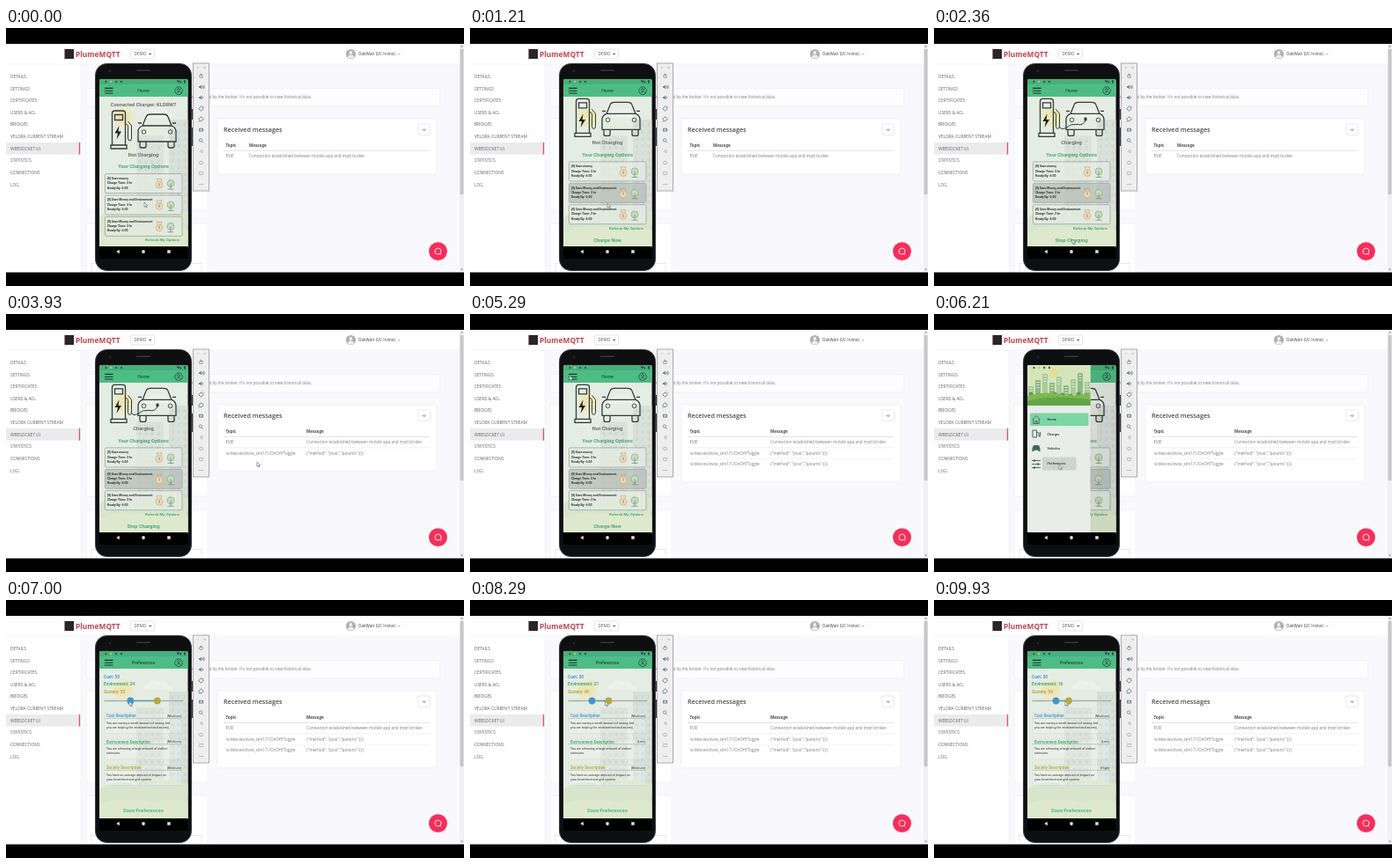
Recreate the animation shown at these times as an HTML page. Size 520 px wide and 293 px high, loop 10 s.

```html
<!DOCTYPE html>
<html lang="en">
<head>
<meta charset="utf-8">
<title>Charging app demo</title>
<style>
html, body { margin: 0; width: 100%; height: 100%; overflow: hidden; background: #000; }
svg { display: block; width: 100vw; height: 100vh; font-family: "Open Sans", "Noto Sans", sans-serif; }
.app { font-family: Roboto, sans-serif; }
</style>
</head>
<body>
<svg id="stage" viewBox="0 0 520 293" preserveAspectRatio="none"></svg>
<script>
const LOOP = 10000;
const GREEN = '#4dbd85', LEAF = '#4aab76', BLUE = '#3d98d0', GOLD = '#b9a83c';

const text = (x, y, s, size, fill, extra = '') =>
  `<text x="${x}" y="${y}" dy=".35em" font-size="${size}" fill="${fill}" ${extra}>${s}</text>`;
const rect = (x, y, w, h, fill, extra = '') =>
  `<rect x="${x}" y="${y}" width="${w}" height="${h}" fill="${fill}" ${extra}/>`;
const circle = (x, y, r, fill, extra = '') => `<circle cx="${x}" cy="${y}" r="${r}" fill="${fill}" ${extra}/>`;
const line = (d, stroke, width = .6, extra = '') =>
  `<path d="${d}" fill="none" stroke="${stroke}" stroke-width="${width}" ${extra}/>`;
const group = (id, body) => `<g id="${id}">${body}</g>`;
const repeat = (n, fn) => Array.from({ length: n }, (_, i) => fn(i)).join('');
const BOLD = 'font-weight="700"', MID = 'text-anchor="middle"', END = 'text-anchor="end"';

function webPage() {
  const menu = ['DETAILS', 'SETTINGS', 'CERTIFICATES', 'USERS &amp; ACL', 'BRIDGES',
    'VELORA CURRENT STREAM', 'WEBSOCKET UI', 'STATISTICS', 'CONNECTIONS', 'LOG'];
  const edge = 'stroke="#e9eaf0" stroke-width=".6"';
  const message = (id, y, topic, body) => group(id,
    text(249.5, y, topic, 4.6, '#7c7c7c') + text(341, y, body, 4.6, '#7c7c7c') +
    line(`M247 ${y - 6.4}H481`, '#e4e6ea', .5));
  const toggle = ['iv/devices/evse_sim1/1/OnOff/Toggle', '{"method": "post","params":{}}'];
  return rect(0, 18, 520, 260, '#fff') +
    rect(85, 41, 430, 237, '#f9f9fd') + line('M0 41H515M85 41V278', '#eeeff3', .6) +
    rect(66.5, 24, 10.5, 11, '#2b2528') +
    text(79, 29.8, 'PlumeMQTT', 8.4, '#c8404c', BOLD) +
    rect(141.5, 24, 27, 11, '#fff', 'rx="1.2" stroke="#d4d6da" stroke-width=".6"') +
    text(145.5, 29.7, 'DEMO', 4.7, '#555') + '<path d="M162 28.8h3.4l-1.7 1.9z" fill="#555"/>' +
    circle(391.5, 29.5, 5.6, '#b3b0af') + circle(391.5, 28, 1.9, '#eee') +
    '<path d="M388 33.5q0-3 3.5-3t3.5 3q-3.5 2-7 0z" fill="#eee"/>' +
    text(400, 29.6, 'OakWatt (UC Irvine)', 4.4, '#666', 'font-weight="600"') +
    line('M444.5 29l1.5 1.4 1.5-1.4', '#666') +
    rect(0, 130, 84, 13.6, '#ebebed') + rect(82.8, 130, 1.4, 13.6, '#dc5564') +
    menu.map((s, i) => text(5, 55.2 + i * 13.65, s, 4.8, '#606060')).join('') +
    rect(91, 68.5, 402, 20.5, '#fdfdfe', `rx="1.5" ${edge}`) +
    text(347, 78.8, "Messages received by the broker. It's not possible to view historical data.", 4.57, '#7c7c7c', END) +
    rect(91, 103, 138, 104, '#fff', edge) + rect(91, 222, 138, 60, '#fff', edge) +
    rect(97, 267.5, 125, 14, '#fff', 'stroke="#d9dbe0" stroke-width=".6"') +
    rect(240, 103, 249, 63, '#fff', `id="panel" rx="1.5" ${edge}`) +
    text(247, 115.6, 'Received messages', 7.2, '#4a4a4a', 'font-weight="600"') +
    rect(468, 109, 13.5, 12.5, '#fff', 'rx="1.2" stroke="#d9dbe0" stroke-width=".6"') +
    line('M473 114.7l1.8 1.7 1.8-1.7', '#444', .8) +
    text(249.5, 133, 'Topic', 4.6, '#505050', BOLD) + text(276, 133, 'Message', 4.6, '#505050', `id="head" ${BOLD}`) +
    line('M247 139.3H481', '#d2d4d9', .7) + text(249.5, 145.7, 'EVIE', 4.6, '#7c7c7c') +
    text(276, 145.7, 'Connection established between mobile app and mqtt broker.', 4.6, '#7c7c7c', 'id="hello"') +
    message('msg1', 158.2, ...toggle) + message('msg2', 170.7, ...toggle) +
    rect(515, 18, 5, 260, '#f0f0f0') + rect(515.6, 24, 3.8, 165, '#c6c6c6') +
    '<path d="M516 21.6h3l-1.5-1.8zM516 273.4h3l-1.5 1.8z" fill="#888"/>' +
    circle(490.5, 253.7, 10.4, '#fb2c57') +
    circle(490.5, 253.5, 3.5, 'none', 'stroke="#fff" stroke-width=".9"') + line('M492.3 256l1.9 1.3', '#fff', .9);
}

function toolbar() {
  const ink = '#75858b', s = d => line(d, ink, .9);
  const ring = (x, y, r, color) => circle(x, y, r, 'none', `stroke="${color}" stroke-width=".8"`);
  const speaker = y => `<path d="M219 ${y - 1}h1.3l1.8-1.6v5.2l-1.8-1.6H219z" fill="${ink}"/>` +
    s(`M223.2 ${y - 1.4}q1 1.4 0 2.8`);
  const turn = (y, a) => rect(219.6, y - 2, 3.8, 4, 'none',
    `stroke="${ink}" stroke-width=".9" transform="rotate(${a} 221.5 ${y})"`);
  return rect(212.5, 40, 18, 145, '#eeeeee', 'stroke="#999" stroke-width=".8"') +
    line('M217 45h2M224.5 44l2 2m0-2l-2 2', '#aaa', .6) +
    ring(221.5, 54.7, 1.9, ink) + s('M221.5 51.7v2.6') +
    speaker(67) + s('M224.4 64.8q1.6 2.2 0 4.4') + speaker(79) +
    turn(91.5, 40) + turn(103.5, 50) + s('M218.5 105.5l1.4 1.2M224.5 89.5l-1.2-1') +
    rect(219, 113.8, 5, 3.8, ink, 'rx=".6"') + circle(221.5, 115.7, 1.1, '#eee') +
    ring(221, 127.5, 1.7, ink) + s('M222.3 128.8l1.7 1.7') +
    line('M222.8 138.4l-2.6 1.8 2.6 1.8z', '#aaa', .7) + ring(221.5, 153, 1.9, '#aaa') +
    rect(219.8, 163.3, 3.4, 3.4, 'none', 'stroke="#aaa" stroke-width=".7"') +
    repeat(3, i => circle(219.8 + i * 1.7, 177.4, .5, ink));
}

function backdrop() {
  const tower = (x, y, w, h, fill) => rect(x, y, w, h, fill) +
    repeat(Math.floor(h / 8), r => repeat(Math.floor(w / 7), c =>
      rect(x + 2.5 + c * 7, y + 4 + r * 8, 3, 4, '#d0d9d1')));
  return rect(106, 58, 101, 191, '#e5ece3') +
    circle(133, 101, 12, '#ebe9c8') + circle(133, 101, 8, '#ede5b4') +
    '<path d="M160 96q5-8 12-3 8-5 12 4 8 1 6 5h-32q-4-4 2-6z" fill="#edf1ec"/>' +
    tower(185, 104, 22, 120, '#d9e0da') + tower(148, 122, 31, 108, '#dbe2dc') +
    '<path d="M106 215q24-15 48-2 25-14 53-4v40H106z" fill="#d7e5cd"/>' +
    '<path d="M106 232q30-12 60-2 24-6 41-1v20H106z" fill="#dee8cd"/>';
}

function chargerArt() {
  const ink = '#343b37';
  const lamp = x => circle(x, 118, 2.3, 'none', `stroke="${ink}" stroke-width=".9"`);
  return line('M120.5 133V97q0-3 3-3h9q3 0 3 3v36zM119 137v-4h18v4zM123.5 98.5h9v6h-9z', ink, 1.3) +
    line('M135.500 109q4 0 3 7v9q0 3 2 3t2-3v-14l-4-5', ink, 1) +
    '<path d="M128.5 111l-5 8.5h3.5l-1.5 7 5.5-9h-3.500z" fill="#1c1f1d"/>' +
    line('M155 111l4-10q1-3 5-3h15q4 0 5 3l4 10M155 111h33q5 2 5 7v11h-43v-11q0-5 5-7z' +
      'M152 129v5q0 2 2 2h3q2 0 2-2v-5M184 129v5q0 2 2 2h3q2 0 2-2v-5M150 108h4M189 108h4', ink, 1.3) +
    lamp(156.5) + lamp(186.5) +
    group('cable', line('M142 125q2 5 8 2 5-5 12-4 8 2 10-5', ink, 1) + rect(170.5, 115, 3, 4, ink, 'rx="1"'));
}

function optionCard(i, title) {
  const y = 165.5 + i * 24.4;
  return rect(112.5, y, 87.5, 22, 'rgba(228,235,227,.75)', `id="card${i}" rx="1.5" stroke="#939e97" stroke-width=".7"`) +
    [`[0] ${title}`, 'Charge Time: 3 hr', 'Ready By: 6:00'].map((s, k) =>
      text(115, y + 5 + k * 5.4, s, 3.5, '#2c332f', BOLD)).join('') +
    circle(174, y + 12.5, 4, '#ecdabb', 'stroke="#c9a273" stroke-width=".6"') +
    line(`M172 ${y + 8.5}l-1-2.5h6l-1 2.5`, '#c9a273', .7) + text(174, y + 12.5, '$', 4.4, '#b98a58', `${BOLD} ${MID}`) +
    circle(187, y + 11, 4, '#c6dcbc', 'stroke="#7f9c80" stroke-width=".6"') +
    line(`M187 ${y + 11}v6.500M183.5 ${y + 17.5}h7`, '#7b8f7f', .8);
}

function homePage() {
  const center = (y, s, size, fill, id = '') => text(156, y, s, size, fill, `${id && `id="${id}"`} ${MID} ${BOLD}`);
  return group('home', group('scroll',
    center(87, 'Connected Charger: KLDRW7', 5.7, '#6c736f') + chargerArt() +
    center(144, 'Not Charging', 5.8, '#6c736f', 'status') + center(157.3, 'Your Charging Options', 5.7, LEAF) +
    optionCard(0, 'Save money') + optionCard(1, 'Save Money and Environment') +
    optionCard(2, 'Save Money and Environment') +
    text(197, 240.8, 'Refresh My Options', 4.4, LEAF, `${BOLD} ${END}`) +
    rect(137, 250, 38, 10, 'rgba(90,140,110,.25)', 'id="press" rx="1.5"') +
    center(255, 'Charge Now', 5.8, LEAF, 'action')));
}

function prefsPage() {
  const block = (y, title, color, id, ...lines) =>
    rect(112, y - 3, 87.5, 23, 'rgba(255,255,255,.18)', 'stroke="#c5d0c7" stroke-width=".4"') +
    line(`M112 ${y + 2.8}H199.5`, '#939e97', .5) +
    text(114, y, title + ' Description', 4.5, color, BOLD) +
    text(199, y - .3, '', 3.9, '#444', `id="${id}" ${END}`) +
    lines.map((s, i) => text(114, y + 7.8 + i * 5, s, 3.65, '#333')).join('');
  return group('prefs',
    text(111, 87.3, '', 4.8, BLUE, `id="cost" ${BOLD}`) + text(111, 95.7, '', 4.8, LEAF, `id="env" ${BOLD}`) +
    text(111, 104, '', 4.8, GOLD, `id="soc" ${BOLD}`) +
    line('M111.5 114.5H201.5', '#a9b0ab', 1.3) + line('', '#62aa92', 1.7, 'id="span"') +
    circle(0, 114.5, 3.9, BLUE, 'id="thumb1"') + circle(0, 114.5, 3.9, GOLD, 'id="thumb2"') +
    block(131.5, 'Cost', BLUE, 'costLevel', 'You are saving a small amount of money, but', 'you are helping the environment and society.') +
    block(161, 'Environment', LEAF, 'envLevel', 'You are releasing a large amount of carbon', 'emission.') +
    block(190.5, 'Society', GOLD, 'socLevel', 'You have an average amount of impact on', 'your local electrical grid system.') +
    text(156, 239, 'Save Preferences', 5.8, GREEN, `${BOLD} ${MID}`));
}

function drawer() {
  const item = (y, s) => text(128.5, y, s, 3.9, '#333', 'font-weight="500"');
  const ink = '#3f6857';
  return group('drawer', rect(106, 58, 71.5, 190, '#e8ede9') + rect(106, 58, 71.5, 46, '#d6e5b8') +
    circle(136, 67, 5, '#e8dc8c') +
    repeat(9, i => {
      const h = 10 + (i * 7) % 17;
      return rect(107 + i * 8, 92 - h, 6, h, i % 2 ? '#8db98a' : '#a9cba0') +
        repeat(3, k => rect(108.5 + i * 8, 94 - h + k * 3, 3, 1, '#d3e6c4'));
    }) +
    repeat(8, i => circle(110 + i * 9, 91 + i % 3, 2.6, '#5c9c56')) +
    '<path d="M106 93q18-6 36-2t35.5-2v15H106z" fill="#7fb84c"/><path d="M106 99q25-8 71.5-2v7H106z" fill="#62a545"/>' +
    rect(109, 112.5, 66.5, 14.5, '#7dd6a6', 'rx="1.5"') + rect(123, 162.5, 38.5, 15, '#cdd3cf', 'id="hover" rx="1.5"') +
    line('M111.5 120l4.5-4.5 4.5 4.5M112.8 119v5.5h6.4v-5.500M115 124.5v-3h2v3', ink, .9) +
    line('M112 140v-8h4.5v8zM116.5 134q3 0 2.5 3t1.5 2v-5', ink, 1) +
    `<path d="M111.5 156v-3.5l1.5-3.5h6l1.5 3.5v3.5h-2v-1.2h-5v1.2z" fill="${ink}"/>` +
    line('M111 166.5h10M111 170.5h10M111 174.5h10', ink, .9) +
    circle(114, 166.5, 1.2, ink) + circle(118, 170.5, 1.2, ink) + circle(114, 174.5, 1.2, ink) +
    item(120, 'Home') + item(136.2, 'Charger') + item(153, 'Vehicles') + item(170, 'Preferences'));
}

function phone() {
  const ink = '#234a39';
  const body = backdrop() + homePage() + prefsPage() +
    rect(106, 58, 101, 20, GREEN) + rect(106, 58, 101, 6, '#45b07b') +
    line('M112 68.4h9.500M112 71.2h9.500M112 74h9.500', '#1d3429', 1.1) +
    text(156, 71.2, 'Home', 5, '#1d3429', `id="title" ${MID}`) +
    circle(196, 71.2, 4.3, 'none', `stroke="${ink}" stroke-width=".8"`) +
    circle(196, 70, 1.4, 'none', `stroke="${ink}" stroke-width=".7"`) +
    line('M193.3 74q2.7-3.5 5.4 0', ink, .7) +
    rect(106, 58, 101, 190, '#000', 'id="dim"') + drawer() +
    repeat(4, i => circle(113.5 + i * 5.8, 61, 1.2, i === 1 ? '#d8c04c' : '#2f634d')) +
    `<path d="M193.5 59.5h4l-2 2.800zM199 62.3v-2.800l-2.5 2.800zM202 59.2h1.7v3.2H202z" fill="${ink}"/>` +
    rect(106, 248, 101, 15, '#000');
  return rect(210, 92, 2, 12, '#333') + rect(210, 113, 2, 21, '#333') +
    rect(101.5, 40.5, 109, 235, '#0e0f11', 'rx="13" stroke="#3d3f43" stroke-width="1"') +
    rect(148, 47.5, 16, 1.4, '#34363a', 'rx=".7"') + circle(118, 49, 1.5, '#1d2430') +
    `<clipPath id="screen">${rect(106, 58, 100.5, 204, '#000', 'rx="2"')}</clipPath><g class="app" clip-path="url(#screen)">${body}</g>` +
    '<path d="M128.8 251.8v4.4l-3.6-2.2z" fill="#ddd"/>' + circle(156, 254, 1.9, '#ddd') + rect(183.2, 252.2, 3.5, 3.5, '#ddd');
}

document.getElementById('stage').innerHTML =
  rect(0, 0, 520, 293, '#000') + webPage() + phone() + toolbar() +
  rect(0, 277.5, 520, 16, '#000') +
  '<path id="cursor" d="M0 0v5.2l1.3-1.1 .9 2 .9-.4-.9-1.9h1.7z" fill="#f4f4f4" stroke="#555" stroke-width=".5"/>';

const el = {};
document.querySelectorAll('[id]').forEach(node => el[node.id] = node);
const set = (id, attr, value) => el[id].setAttribute(attr, value);
const show = (id, on) => set(id, 'visibility', on ? 'visible' : 'hidden');
const between = (t, a, b) => t >= a && t < b;

// Eased progress from a to b.
function ease(t, a, b) {
  const p = Math.min(1, Math.max(0, (t - a) / (b - a)));
  return p * p * (3 - 2 * p);
}
const mix = (a, b, p) => a + (b - a) * p;
const slide = v => 111.5 + .9 * v;

// Cursor stops: leave time, arrival time, x, y.
const stops = [[930, 1200, 156, 199], [1260, 1600, 157, 240], [3000, 3550, 285, 168],
  [3930, 4005, 180, 226], [4005, 4200, 157, 240], [4560, 5260, 113, 70], [5600, 6150, 142, 171],
  [6550, 7000, 140, 115], [7050, 7350, 137.5, 115], [7400, 7600, 169, 115]];

function cursorAt(t, second) {
  if (t > 7620) return [slide(second) - 4, 115];
  let x = 157, y = 198;
  for (const [a, b, nx, ny] of stops) {
    const p = ease(t, a, b);
    x = mix(x, nx, p);
    y = mix(y, ny, p);
  }
  return [x, y];
}

function draw(t) {
  const charging = between(t, 2100, 4500), prefs = t >= 6500;
  const messages = (t >= 2500) + (t >= 4780);

  set('scroll', 'transform', `translate(0 ${-13.6 * ease(t, 900, 1180)})`);
  const shade = 45 * ease(t, 330, 640);
  set('card1', 'fill', `rgba(${228 - shade},${235 - shade},${227 - shade},.75)`);
  el.status.textContent = charging ? 'Charging' : 'Not Charging';
  el.action.textContent = charging ? 'Stop Charging' : 'Charge Now';
  show('cable', charging);
  show('press', !prefs && (between(t, 1780, 2050) || between(t, 4340, 4500)));
  show('home', !prefs);
  show('prefs', prefs);
  if (prefs) show('cable', false);
  el.title.textContent = prefs ? 'Preferences' : 'Home';

  set('panel', 'height', 63 + 12.4 * messages);
  set('head', 'x', messages ? 341 : 276);
  set('hello', 'x', messages ? 341 : 276);
  show('msg1', messages > 0);
  show('msg2', messages > 1);

  const open = ease(t, 5400, 5700) - ease(t, 6450, 6750);
  set('drawer', 'transform', `translate(${-73 * (1 - open)} 0)`);
  set('dim', 'opacity', .07 * open);
  show('hover', between(t, 6080, 6750));

  const first = Math.round(33 - 3 * ease(t, 7050, 7350));
  const second = Math.round(67 - 16 * ease(t, 7620, 8250) - 2 * ease(t, 8590, 8640) - 3 * ease(t, 8790, 9750));
  const level = v => v < 25 ? '[Low]' : v < 50 ? '[Medium]' : '[High]';
  for (const [id, name, v] of [['cost', 'Cost', first], ['env', 'Environment', second - first], ['soc', 'Society', 100 - second]]) {
    el[id].textContent = `${name}: ${v}`;
    el[id + 'Level'].textContent = level(v);
  }
  set('thumb1', 'cx', slide(first));
  set('thumb2', 'cx', slide(second));
  set('span', 'd', `M${slide(first)} 114.5H${slide(second)}`);

  set('cursor', 'transform', `translate(${cursorAt(t, second).join(' ')})`);
}

const start = performance.now();
function tick() {
  draw((performance.now() - start) % LOOP);
  requestAnimationFrame(tick);
}
tick();
</script>
</body>
</html>
```
